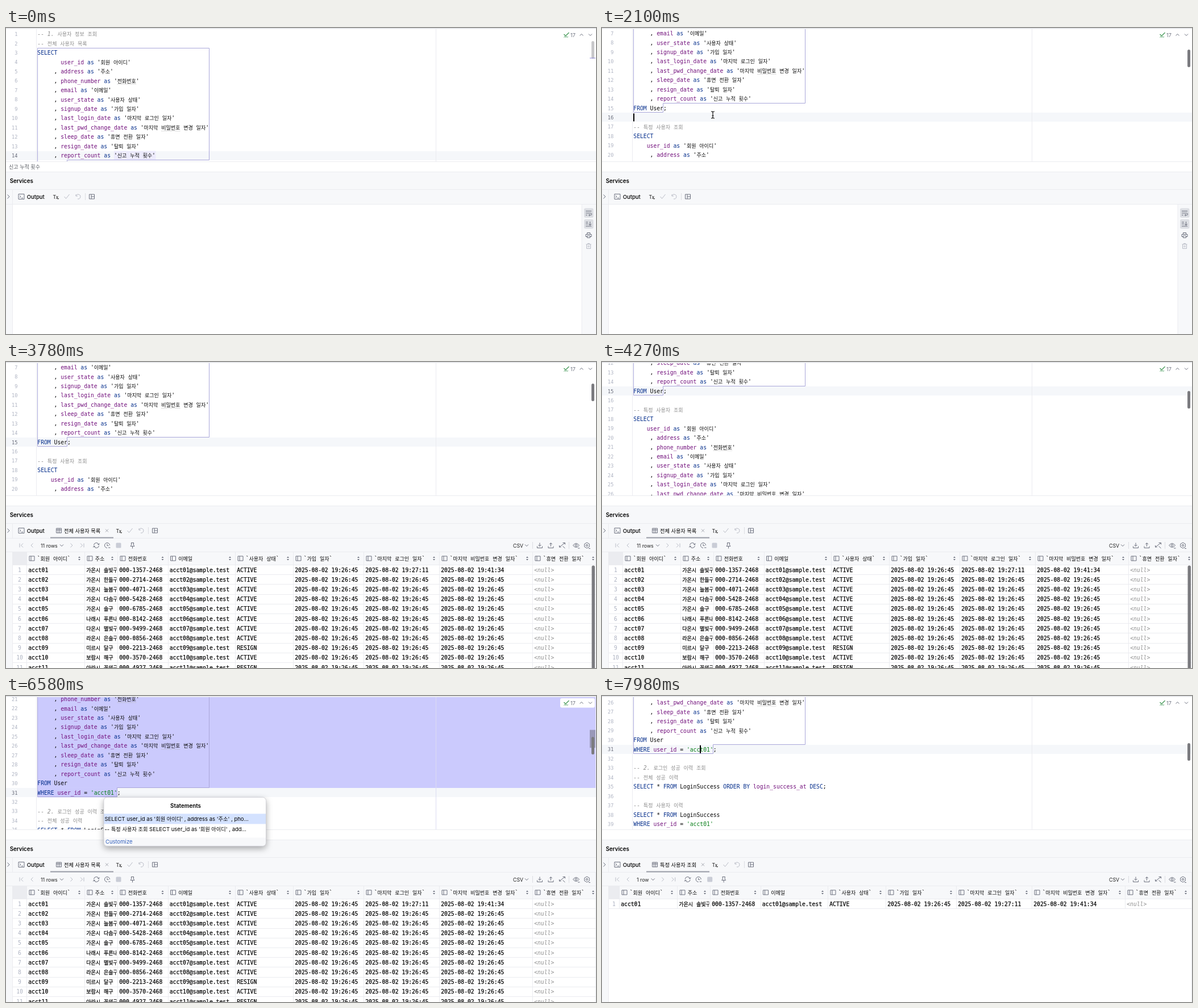
Animation, 1038 px wide and 539 px high, one loop 8 s. Source, as an HTML page with a canvas:

```html
<!DOCTYPE html>
<html lang="ko">
<head>
<meta charset="utf-8">
<style>
html, body { margin: 0; width: 100%; height: 100%; overflow: hidden; background: #fff; }
canvas { display: block; }
</style>
</head>
<body>
<canvas id="stage" width="1038" height="539"></canvas>
<script>
const ctx = document.getElementById('stage').getContext('2d');
const LOOP = 8000, STEP = 70, LINE_H = 16.46, CODE_X = 55.3;
const MONO = '"DejaVu Sans Mono", monospace';
const UI = 'Inter, sans-serif', HANGUL = '"Noto Sans CJK KR", "Noto Sans CJK", sans-serif';
const PANEL = '#f7f8fa', RULE = '#ebecf0', ICON = '#6c707e', FAINT = '#b9bcc6', INK = '#080808';

const FIELDS = [
  ['user_id', '회원 아이디'], ['address', '주소'], ['phone_number', '전화번호'], ['email', '이메일'],
  ['user_state', '사용자 상태'], ['signup_date', '가입 일자'], ['last_login_date', '마지막 로그인 일자'],
  ['last_pwd_change_date', '마지막 비밀번호 변경 일자'], ['sleep_date', '휴면 전환 일자'],
  ['resign_date', '탈퇴 일자'], ['report_count', '신고 누적 횟수'],
];
const fieldLines = indent => FIELDS.map(([name, alias], i) =>
  (i ? '     , ' : ' '.repeat(indent)) + `${name} as '${alias}'`);
const CODE = [
  '-- 1. 사용자 정보 조회', '-- 전체 사용자 목록', 'SELECT', ...fieldLines(7), 'FROM User;', '',
  '-- 특정 사용자 조회', 'SELECT', ...fieldLines(4), 'FROM User', "WHERE user_id = 'acct01';", '',
  '-- 2. 로그인 성공 이력 조회', '-- 전체 성공 이력',
  'SELECT * FROM LoginSuccess ORDER BY login_success_at DESC;', '',
  '-- 특정 사용자 이력', 'SELECT * FROM LoginSuccess', "WHERE user_id = 'acct01'",
];

const PLACES = ['가온시 솔빛구', '가온시 한들구', '가온시 늘봄구', '가온시 다솜구', '가온시 솔구', '나래시 푸른내구',
  '다온시 별빛구', '라온시 은솔구', '미르시 달구', '보람시 해구', '아라시 꽃뫼구'];
const NOON = '2025-08-02 19:26:45';
const ROWS = PLACES.map((place, i) => {
  const id = 'acct' + String(i + 1).padStart(2, '0');
  const phone = `000-${String((i + 1) * 1357 % 10000).padStart(4, '0')}-2468`;
  return [id, place, phone, id + '@sample.test', i === 8 || i === 10 ? 'RESIGN' : 'ACTIVE', NOON,
    i ? NOON : '2025-08-02 19:27:11', i ? NOON : '2025-08-02 19:41:34', '<null>'];
});
const COLUMNS = [36, 138, 196, 284.5, 403, 505, 629, 762, 926, 1042];

const SCROLL = [[210, 0], [1050, 92], [1330, 100], [3780, 100], [4270, 190], [4690, 228], [4830, 228],
  [5250, 334.4], [7490, 334.4], [7980, 410.6]];

// Interpolates [time, value] pairs with a smooth ease on every segment.
function tween(t, keys) {
  if (t <= keys[0][0]) return keys[0][1];
  for (let i = 1; i < keys.length; i++) {
    const [t0, a] = keys[i - 1], [t1, b] = keys[i];
    if (t < t1) {
      const p = (t - t0) / (t1 - t0);
      return a + (b - a) * p * p * (3 - 2 * p);
    }
  }
  return keys[keys.length - 1][1];
}
const within = (t, from, to) => t >= from && t < to;

function rect(x, y, w, h, color) {
  ctx.fillStyle = color;
  ctx.fillRect(x, y, w, h);
}
function roundRect(x, y, w, h, r, color) {
  ctx.beginPath();
  ctx.roundRect(x, y, w, h, r);
  ctx.fillStyle = color;
  ctx.fill();
}
function clipped(x, y, w, h, draw) {
  ctx.save();
  ctx.beginPath();
  ctx.rect(x, y, w, h);
  ctx.clip();
  draw();
  ctx.restore();
}

// Draws mixed Latin and Hangul text centred on y, thickened by heft; returns the end x.
function write(text, x, y, color, font, hangulFont, heft = 0) {
  ctx.fillStyle = ctx.strokeStyle = color;
  ctx.lineWidth = heft;
  for (const run of text.match(/[가-힣]+|[^가-힣]+/g) || []) {
    ctx.font = /[가-힣]/.test(run) ? hangulFont : font;
    ctx.fillText(run, x, y + 3.5);
    if (heft) ctx.strokeText(run, x, y + 3.5);
    x += ctx.measureText(run).width;
  }
  return x;
}
const mono = (text, x, y, color = INK, style = '', heft = 0) =>
  write(text, x, y, color, `${style} 9.72px ${MONO}`, `9px ${HANGUL}`, heft);
const label = (text, x, y, color = '#000', weight = 400, size = 9.5) =>
  write(text, x, y, color, `${weight} ${size}px ${UI}`, `${weight} ${size - .3}px ${HANGUL}`);

function icon(path, x, y, color = ICON, width = 1) {
  ctx.save();
  ctx.translate(x, y);
  ctx.strokeStyle = color;
  ctx.lineWidth = width;
  ctx.stroke(new Path2D(path));
  ctx.restore();
}
const DOWN = 'M-3-1.5L0 1.5L3-1.5', UP = 'M-3 1.5L0-1.5L3 1.5';
const LEFT = 'M1.5-3.5L-2 0L1.5 3.5', RIGHT = 'M-1.5-3.5L2 0L-1.5 3.5';
const CHECK = 'M-4.5 0L-1.5 3.5L4.5-4';
const GRID = 'M-4.5-4h9v8h-9zM-4.5-1.2h9M-1.5-4v8M1.5-4v8';
const COLUMN = 'M-4.5-4h9v8h-9zM-1.5-4v8';

const lineY = (n, scroll) => 10.8 + (n - 1) * LINE_H - scroll;
const lineTop = (n, scroll) => lineY(n, scroll) - LINE_H / 2;

function tokenColor(token) {
  if (token.startsWith('--')) return '#8c8c8c';
  if (token.startsWith("'")) return token.includes('acct') ? '#067d17' : INK;
  if (/^([A-Z]+|as)$/.test(token)) return '#062f8c';
  return /^[a-z_]+$/.test(token) ? '#72107c' : INK;
}

function codeLine(text, y) {
  let x = CODE_X;
  for (const token of text.match(/--.*|'[^']*'|\w+|\s+|./g) || []) {
    const start = x;
    x = mono(token, x, y, tokenColor(token), token.startsWith('--') ? 'italic' : '');
    const word = token.match(/전화번호|비밀번호/);
    if (word) {
      const from = start + 5.85 + (word.index > 1 ? 30.7 : 0);
      for (let d = 0; d < 33; d += 2) rect(from + d, y + 5.5, 1, 1, '#b5b5b5');
    }
  }
}

function statementBox(first, last, endX, scroll) {
  const top = Math.round(lineTop(first, scroll)) + .5, mid = Math.round(lineTop(last, scroll)) - .5;
  const bottom = Math.round(lineTop(last + 1, scroll)) - .5;
  icon(`M55.5 ${top}H357.5V${mid}H${endX}V${bottom}H55.5Z`, 0, 0, '#aaa7da');
}

function popup(x, y, items) {
  ctx.save();
  ctx.shadowColor = 'rgba(0,0,0,.35)';
  ctx.shadowBlur = 12;
  ctx.shadowOffsetY = 4;
  roundRect(x, y, 285.5, 86, 6, '#fff');
  ctx.restore();
  clipped(x, y, 285, 86, () => {
    ctx.textAlign = 'center';
    label('Statements', x + 144, y + 15, '#000', 600, 9.75);
    ctx.textAlign = 'left';
    rect(x, y + 29, 286, 18, '#d4e2ff');
    label(items[0], x + 1.5, y + 38.5);
    label(items[1], x + 1.5, y + 56.5);
    roundRect(x, y + 71, 285.5, 15, [0, 0, 6, 6], PANEL);
    label('Customize', x + 3, y + 78.5, '#315fbd');
  });
  icon(`M${x + 6} ${y}h273.5a6 6 0 0 1 6 6v74a6 6 0 0 1-6 6h-273.5a6 6 0 0 1-6-6v-74a6 6 0 0 1 6-6z`, 0, 0, '#c4c5cc', .7);
}

function pointer(x, y) {
  const beam = 'M-3-6Q0-6 0-4.5Q0-6 3-6M0-5V5M-3 6Q0 6 0 4.5Q0 6 3 6M-1.5 1.5h3';
  icon(beam, x, y, '#fff', 2.4);
  icon(beam, x, y, '#111', 1.2);
}

function editor(t) {
  const scroll = tween(t, SCROLL);
  const current = t < 1820 ? 14 : t < 2310 ? 16 : t < 5950 ? 15 : 31;
  const choosing = within(t, 2800, 3430) ? 1 : within(t, 6440, 6930) ? 2 : 0;
  const [first, last, endX] = t < 5390 ? [3, 15, 107.5] : [18, 31, 195.5];

  clipped(0, 2, 1038, 233.5, () => {
    rect(0, Math.round(lineTop(current, scroll)), 1038, 16, '#f5f7fa');
    if (current === 14) rect(190, lineTop(14, scroll), 73.5, LINE_H, '#edebfc');
    if (choosing) {
      const top = lineTop(first, scroll), end = lineTop(last, scroll);
      rect(CODE_X, top, 982, end - top, '#cbcafd');
      rect(CODE_X, end, endX - CODE_X, LINE_H, '#cbcafd');
      rect(1027, 21 + (top + scroll) * .137, 10, (end - top + LINE_H) * .137, '#9998b8');
    }
    rect(53, 0, 1, 236, RULE);
    rect(756, 0, 1, 236, choosing ? '#dcdcf2' : RULE);
    CODE.forEach((text, i) => {
      const y = lineY(i + 1, scroll);
      if (y < -8 || y > 244) return;
      ctx.font = `8.6px ${MONO}`;
      ctx.fillStyle = i + 1 === current ? '#666a78' : '#aeb3c2';
      ctx.textAlign = 'right';
      ctx.fillText(i + 1, 20.3, y + 3.3);
      ctx.textAlign = 'left';
      codeLine(text, y);
    });
    if (t < 5390 || t >= 6440) statementBox(first, last, endX, scroll);
    if (within(t, 1820, 2310)) rect(55, lineTop(16, scroll) + 1, 2, 14, '#000');
    if (within(t, 5950, 6300) || t >= 7000) rect(172, lineTop(31, scroll) + 1, 2, 14, '#000');
  });

  if (choosing) roundRect(975, 4, 61, 16.5, 3, '#fff');
  icon('M-4.5-1L-1.5 2L4.5-4', 986, 12, '#4a9c5d', 1.4);
  icon('M-4.5 4l1.5-1.5l1.5 1.5l1.5-1.5l1.5 1.5l1.5-1.5', 986, 12.5, '#4a9c5d');
  label('17', 993, 12, '#6c707e', 400, 9);
  icon(UP, 1012.5, 12);
  icon(DOWN, 1028, 12);
  roundRect(1030, Math.round(23 + scroll * .146), 5, 31, 2.5, t < 280 ? '#c8c8ca' : '#7b7b7f');
  if (t < 280) rect(1027, 52.5, 10, 1, '#8c86d8');
  rect(0, 0, 1038, 1.5, '#e3e4e8');
  rect(0, 235, 1038, 1, RULE);
  if (t < 2100) label('신고 누적 횟수', 5, 244, '#55585f', 400, 9.3);
  return { scroll, choosing };
}

function overlays(t, { scroll, choosing }) {
  const select = "SELECT user_id as '회원 아이디' , address as '주소' , pho...";
  if (choosing === 1) popup(113, lineTop(16, scroll), [select, "-- 1. 사용자 정보 조회 -- 전체 사용자 목록 SELECT user_id as '회원..."]);
  if (choosing === 2) popup(172, lineTop(32, scroll), [select, "-- 특정 사용자 조회 SELECT user_id as '회원 아이디' , add..."]);
  if (within(t, 1470, 2590)) {
    pointer(tween(t, [[1470, 215], [1960, 195], [2240, 195], [2520, 114]]),
      tween(t, [[1470, 64], [1820, 153], [2240, 153], [2380, 142]]));
  }
  if (within(t, 5460, 6300)) {
    pointer(tween(t, [[5460, 190], [5950, 173]]), tween(t, [[5460, 138], [5950, 172]]));
  }
}

function tabs(hasTable, title) {
  rect(0, 253, 1038, 57, PANEL);
  for (const y of [253, 284, 310]) rect(0, y, 1038, 1, RULE);
  label('Services', 6.7, 269, '#000', 600, 9.75);
  icon(RIGHT, 4, 297);
  rect(11, 284, 1, 26, RULE);
  icon('M-5-4.5h10v9h-10zM-3-2l2 2l-2 2M0 2.5h3', 27, 297);
  label('Output', 36.7, 297, '#000', 500);
  const dx = hasTable ? 111 : 0;
  if (hasTable) {
    icon(GRID, 93, 297);
    label(title, 102, 297, '#000', 500);
    icon('M-2.5-2.5l5 5M2.5-2.5l-5 5', 177.5, 297, '#9a9da8', .9);
    rect(78, 308.5, 111, 2, '#9a9da8');
  }
  label('Tx', 82.5 + dx, 297, '#333', 500, 8.5);
  icon('M0 0l1.5 1.5l1.5-1.5', 90 + dx, 300, '#333');
  icon(CHECK, 107 + dx, 297, FAINT);
  icon('M-4-4v3h3M-4-1A4 4 0 1 1-1 4', 127 + dx, 297, FAINT);
  rect(139 + dx, 291, 1, 12, '#dcdde2');
  icon('M-4.5-4h9v8h-9zM-1-4v8M-1 0h5.5', 151 + dx, 297);
}

function emptyOutput() {
  rect(0, 311, 11, 228, PANEL);
  rect(11, 311, 1, 228, RULE);
  rect(1013, 311, 25, 228, PANEL);
  rect(1012.5, 311, 1, 228, RULE);
  for (const y of [317.5, 337]) roundRect(1017, y, 16.5, 16.5, 2.5, '#dcdee3');
  icon('M-5-3.5h10M-5 0h8q2.5 0 2.5 1.8t-2.5 1.8h-2.5M2 1.8l-1.8 1.8l1.8 1.8M-5 3.5h2.5', 1025, 326);
  icon('M-5-3h4M-5 0h4M-5 4h10M2.5-4v6M0 0l2.5 2.5l2.5-2.5', 1025, 345);
  icon('M-2.5-1.5v-3h5v3M-2.5 2.5h-2.5v-4h10v4h-2.5M-2.5 1h5v3.5h-5z', 1025, 365);
  icon('M-4.5-3h9M-1.5-3v-1.5h3v1.5M-3.5-3v7.5h7v-7.5M-1-1v3.5M1-1v3.5', 1025, 384, FAINT);
}

function tableToolbar(count) {
  rect(0, 311, 1038, 23, PANEL);
  const y = 323, dx = count === '1 row' ? -8.3 : 0;
  icon('M-3-3.5v7M3-3.5L-.5 0L3 3.5', 27, y, FAINT);
  icon(LEFT, 46, y, FAINT);
  label(count, 61, y, '#222', 400, 8.8);
  icon(DOWN, 98 + dx, y);
  icon(RIGHT, 115 + dx, y, FAINT);
  icon('M3-3.5v7M-3-3.5L.5 0L-3 3.5', 134 + dx, y, FAINT);
  icon('M-4.5-.5A4.5 4.5 0 0 1 4-2M4.5.5A4.5 4.5 0 0 1-4 2M5.5-3.5L4.3-1L2-2.2M-5.5 3.5L-4.3 1L-2 2.2', 159 + dx, y);
  icon('M4.5 0A4.5 4.5 0 1 0 0 4.5M0-2.5V0.5H2.5M2 4h3.5', 178 + dx, y);
  roundRect(193.5 + dx, 318.5, 9, 9, 1.5, '#c9ccd6');
  icon('M-2.5-4.5h5M-2-4.5v4l-1.5 2h7l-1.5-2v-4M0 1.5v4', 222.5 + dx, y);
  label('CSV', 892, y, '#222', 400, 8.8);
  icon(DOWN, 916, y);
  rect(926, 317, 1, 12, '#dcdde2');
  icon('M0-4.5v6M-2.5-1L0 1.5L2.5-1M-4.5 1.5v3h9v-3', 939, y);
  icon('M0 2v-6M-2.5-1.8L0-4.3L2.5-1.8M-4.5 1.5v3h9v-3', 958.5, y);
  icon('M5-4.5L-5 3M1-4.5h4v3M-5 0v3h3M1 1.5l4 3.5', 978.5, y);
  rect(990, 317, 1, 12, '#dcdde2');
  icon('M-5.5 0Q0-7 5.5 0Q0 7-5.5 0ZM1.8 0a1.8 1.8 0 1 1-3.6 0a1.8 1.8 0 1 1 3.6 0M3 5h3.5', 1003, y);
  icon('M0-5l4.3 2.5v5L0 5l-4.3-2.5v-5ZM1.6 0a1.6 1.6 0 1 1-3.2 0a1.6 1.6 0 1 1 3.2 0M3 5.5h3', 1022, y);
}

function table(rows, shift, scrollbar) {
  const rowH = 17.2, bottom = Math.min(539, 357 + rows.length * rowH);
  rect(0, 311, 11, 228, PANEL);
  rect(12, 334, 1026, 23, PANEL);
  rect(12, 334, 24 + shift, 23, RULE);
  rect(11, 334, 1, 205, RULE);
  rect(0, 334, 1038, 1, RULE);
  rect(12, 357, 1026, 1, RULE);
  COLUMNS.slice(0, -1).forEach((col, c) => {
    const x = col + shift, w = COLUMNS[c + 1] - col, alias = FIELDS[c][1];
    rect(Math.round(x), 334, 1, bottom - 334, RULE);
    icon(COLUMN, x + 9.5, 346);
    mono(alias.includes(' ') ? `\`${alias}\`` : alias, x + 18.7, 346);
    ctx.fillStyle = ICON;
    ctx.fill(new Path2D(`M${x + w - 11} 345h4l-2-2.4zM${x + w - 11} 347h4l-2 2.4z`));
    clipped(x, 357, w - 1.5, 182, () => rows.forEach((row, r) => {
      const empty = row[c] === '<null>';
      mono(row[c], x + 3.2, 366 + r * rowH, empty ? '#8f8f8f' : INK, empty ? 'italic' : '', empty ? 0 : .25);
    }));
  });
  ctx.textAlign = 'center';
  rows.forEach((row, r) => {
    rect(12, Math.round(357 + (r + 1) * rowH), 1025, 1, RULE);
    ctx.font = `9.72px ${MONO}`;
    ctx.fillStyle = '#aeb3c2';
    ctx.fillText(r + 1, 24 + shift / 2, 369.5 + r * rowH);
  });
  ctx.textAlign = 'left';
  if (scrollbar) roundRect(1030.5, 358.5, 5.5, 190, 2.5, '#7b7b7f');
  rect(1037, 311, 1, 228, RULE);
}

function spinner(t) {
  const head = Math.floor(t / 140);
  for (let i = 0; i < 8; i++) {
    const a = i * Math.PI / 4, c = Math.cos(a), s = Math.sin(a);
    const age = ((head - i) % 8 + 8) % 8;
    ctx.lineCap = 'round';
    icon(`M${c * 5} ${s * 5}L${c * 9} ${s * 9}`, 524, 446, `rgba(125,128,140,${.85 - age * .09})`, 2.2);
    ctx.lineCap = 'butt';
  }
}

function draw(t) {
  rect(0, 0, 1038, 539, '#fff');
  const state = editor(t);
  const hasTable = t >= 3500, single = t >= 7140;
  tabs(hasTable, single ? '특정 사용자 조회' : '전체 사용자 목록');
  if (hasTable) {
    tableToolbar(t >= 7560 ? '1 row' : '11 rows');
    table(single ? ROWS.slice(0, 1) : ROWS, single ? -6 : 0, t < 4690);
  } else {
    emptyOutput();
  }
  if (within(t, 3500, 3780) || within(t, 7000, 7560)) spinner(t);
  overlays(t, state);
}

function frame() {
  const t = performance.now() % LOOP;
  draw(Math.floor(t / STEP) * STEP);
  requestAnimationFrame(frame);
}
frame();
</script>
</body>
</html>
```
